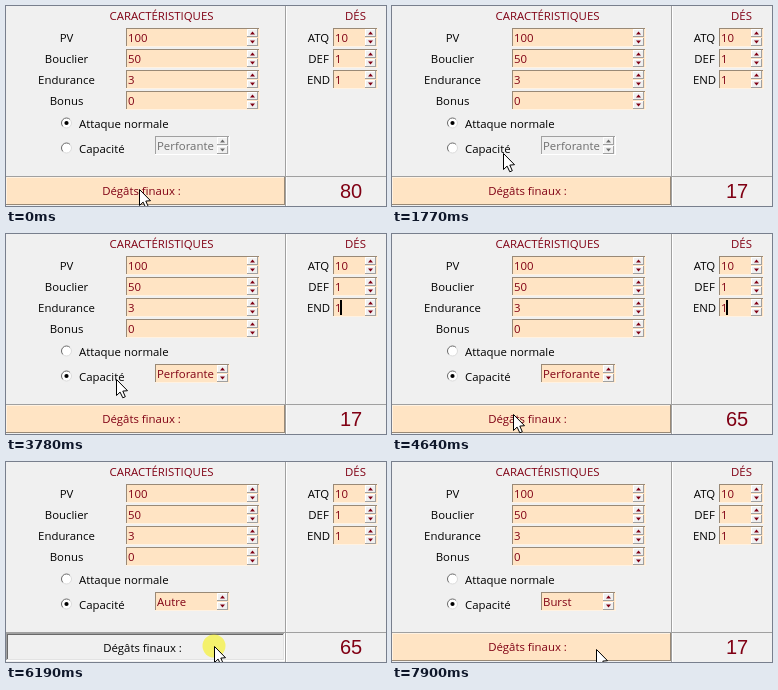
An HTML page with a canvas that plays this animation: 380 px wide and 200 px high, repeating every 8000 ms.

```html
<!DOCTYPE html>
<html lang="fr">
<head>
<meta charset="utf-8">
<title>Calcul des dégâts</title>
<style>
  html, body { margin: 0; width: 100%; height: 100%; overflow: hidden; background: #f0f0f0; }
  canvas { display: block; }
</style>
</head>
<body>
<canvas id="stage" width="380" height="200"></canvas>
<script>
const ctx = document.getElementById('stage').getContext('2d');
const LOOP = 8000, TICK = 77.45, TICK_LEAD = 16;
const FACE = '#f0f0f0', BISQUE = '#ffe4c4', MAROON = '#800014', GREY = '#a0a0a0';
const UI = '11.4px "Open Sans", "Noto Sans", sans-serif';
const BIG = '20px "Liberation Sans", Arial, sans-serif';
const ROW = 21;

// Pointer stops, timed in screen ticks; `sets` applies when the click is released
const STOPS = [
  { x: 133, y: 183, leave: -1, arrive: 0, click: 8, onButton: true, sets: { total: '17' } },
  { x: 110, y: 145, leave: 16, arrive: 24, click: 48, sets: { skillChosen: true } },
  { x: 121, y: 180, leave: 52, arrive: 56, click: 58, onButton: true, sets: { total: '65' } },
  { x: 223, y: 145, leave: 61, arrive: 66, click: 70, sets: { skill: 'Autre' } },
  { x: 208, y: 184, leave: 72, arrive: 79, click: 79, onButton: true, sets: { total: '17' } },
  { x: 220, y: 139, leave: 82, arrive: 87, click: 88, sets: { skill: 'Burst' } },
  { x: 204, y: 187, leave: 91, arrive: 95 }
];

const smooth = p => p * p * (3 - 2 * p);

function stateAt(tick) {
  const state = { ...STOPS[0], total: '80', skill: 'Perforante', skillChosen: false };
  for (const stop of STOPS) {
    if (tick < stop.leave) break;
    const p = smooth(Math.min(1, (tick - stop.leave) / (stop.arrive - stop.leave)));
    state.x += (stop.x - state.x) * p;
    state.y += (stop.y - state.y) * p;
    const release = stop.click + (stop.onButton ? 2 : 1);
    state.clicking = tick >= stop.click && tick < release;
    state.pressed = state.clicking && stop.onButton;
    if (tick >= release) Object.assign(state, stop.sets);
  }
  state.caret = (tick * TICK - 35 + 891) % 891 < 606;
  return state;
}

function rect(x, y, w, h, color) {
  ctx.fillStyle = color;
  ctx.fillRect(x, y, w, h);
}

function text(value, x, y, color = '#000', align = 'left', font = UI) {
  ctx.font = font;
  ctx.textAlign = align;
  ctx.fillStyle = color;
  ctx.fillText(value, x, y);
}

// One-pixel frame with separate top-left and bottom-right colours
function bevel(x, y, w, h, topLeft, bottomRight) {
  rect(x, y, w, 1, topLeft);
  rect(x, y, 1, h, topLeft);
  rect(x, y + h - 1, w, 1, bottomRight);
  rect(x + w - 1, y, 1, h, bottomRight);
}

function polygon(points, color) {
  ctx.beginPath();
  points.forEach(([x, y]) => ctx.lineTo(x, y));
  ctx.closePath();
  ctx.fillStyle = color;
  ctx.fill();
}

function disc(x, y, r, color) {
  ctx.beginPath();
  ctx.arc(x, y, r, 0, Math.PI * 2);
  ctx.fillStyle = color;
  ctx.fill();
}

function spinbox(x, y, w, value, enabled = true) {
  const ink = enabled ? MAROON : '#6d6d6d';
  rect(x, y, w, 19, enabled ? BISQUE : FACE);
  bevel(x, y, w, 19, enabled ? '#998976' : GREY, enabled ? '#fff2e2' : '#fff');
  text(value, x + 2, y + 14, ink);
  const left = x + w - 13, mid = left + 5.5, center = y + 9.5;
  for (const side of [-1, 1]) {
    const top = center + side * 4.5 - 4;
    rect(left, top, 11, 8, FACE);
    bevel(left, top, 11, 8, '#fff', GREY);
    const base = center + side * 3, tip = center + side * 6;
    polygon([[mid - 2.5, base], [mid + 2.5, base], [mid, tip]], ink);
  }
}

// Sunken ring: dark towards the top left, light towards the bottom right
function radio(y, label, selected) {
  const x = 60.5;
  disc(x, y, 5, '#fff');
  ctx.lineWidth = 1;
  ['#696969', '#dcdcdc'].forEach((color, half) => {
    ctx.beginPath();
    ctx.arc(x, y, 5, Math.PI * (0.75 + half), Math.PI * (1.75 + half));
    ctx.strokeStyle = color;
    ctx.stroke();
  });
  if (selected) disc(x, y, 2.1, '#000');
  text(label, 73, y + 5);
}

function button(pressed) {
  rect(0, 171, 279, 28, pressed ? FACE : BISQUE);
  if (pressed) {
    bevel(0, 171, 279, 28, GREY, '#fff');
    bevel(1, 172, 277, 26, '#696969', '#e3e3e3');
  } else {
    bevel(0, 171, 279, 28, '#fff2e2', '#998976');
  }
  const shift = pressed ? 1 : 0;
  text('Dégâts finaux :', 135.5 + shift, 189 + shift, pressed ? '#000' : MAROON, 'center');
}

function pointer(x, y) {
  ctx.save();
  ctx.translate(x + 0.5, y + 0.5);
  polygon([[0, 0], [0, 16], [3.6, 12.6], [6.3, 18.3], [8.8, 17.2], [6.3, 11.6], [11, 11.2]], '#fff');
  ctx.strokeStyle = '#000';
  ctx.lineWidth = 1;
  ctx.stroke();
  ctx.restore();
}

function fields(rows, labelX, boxX, boxWidth) {
  rows.forEach(([label, value], i) => {
    text(label, labelX, 36 + i * ROW, '#000', 'center');
    spinbox(boxX, 22 + i * ROW, boxWidth, value);
  });
}

function draw(time) {
  const state = stateAt(Math.floor((time + TICK_LEAD) / TICK));
  rect(0, 0, 380, 200, FACE);
  rect(279, 0, 1, 200, GREY);
  rect(280, 0, 1, 200, '#fff');
  rect(0, 170, 380, 1, GREY);

  text('CARACTÉRISTIQUES', 155.5, 14, MAROON, 'center');
  text('DÉS', 349.5, 14, MAROON, 'center');
  fields([['PV', '100'], ['Bouclier', '50'], ['Endurance', '3'], ['Bonus', '0']], 60.5, 120, 134);
  fields([['ATQ', '10'], ['DEF', '1'], ['END', '1']], 312.5, 327, 45);
  if (state.caret) rect(334, 66, 2, 15, '#000');

  radio(117, 'Attaque normale', !state.skillChosen);
  radio(142, 'Capacité', state.skillChosen);
  spinbox(149, 130, 75, state.skill, state.skillChosen);

  button(state.pressed);
  text(state.total, 345, 192, MAROON, 'center', BIG);

  const x = Math.round(state.x), y = Math.round(state.y);
  if (state.clicking) disc(x, y, 11.5, 'rgba(248, 242, 0, 0.55)');
  pointer(x, y);
}

const start = performance.now();
function frame() {
  draw((performance.now() - start) % LOOP);
  requestAnimationFrame(frame);
}
frame();
</script>
</body>
</html>
```
